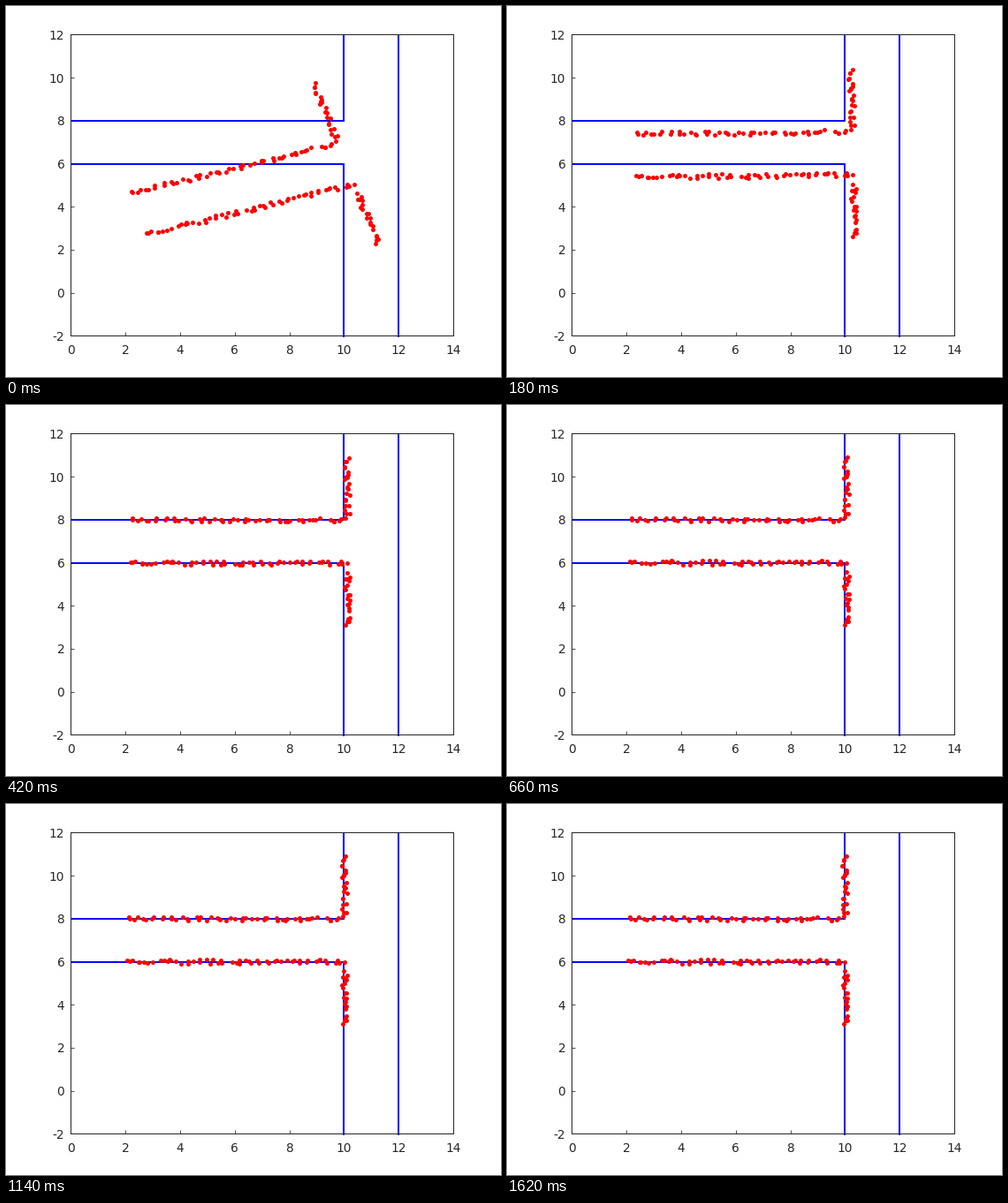
Write a matplotlib script that moves like this. It is 560 px wide and 420 px high and loops after 1.8 s.

```python
import numpy as np
import matplotlib.pyplot as plt
from matplotlib.animation import FuncAnimation

W, H, DPI = 560, 420, 100
FRAMES, STEP_MS, LAST = 30, 60, 27
INK = "#262626"
PT = 72 / DPI  # points per pixel

plt.rcParams.update({
    "font.family": "DejaVu Sans",
    "font.size": 13.8 * PT,
    "axes.unicode_minus": False,
    "toolbar": "None",
})

# Axes box in stage pixels, and the data limits
LEFT, RIGHT, TOP, BOTTOM = 73.1, 506.1, 32.4, 373.4
X_MAX, Y_MIN, Y_MAX = 14, -2, 12

rng = np.random.default_rng(4)


def spread(a, b, n):
    """Irregular positions that still cover the whole range."""
    gap = (b - a) / (n - 1)
    return np.clip(np.linspace(a, b, n) + rng.uniform(-gap, gap, n), a, b)


def hits(start, end, level, n, upright=False):
    """Noisy scan hits along one wall."""
    along = spread(start, end, n)
    across = level + rng.uniform(-0.1, 0.1, n)
    return np.column_stack([across, along] if upright else [along, across])


scan = np.vstack([
    hits(2.0, 9.85, 8, 52),
    hits(2.0, 10.0, 6, 56),
    hits(8.1, 10.9, 10, 24, upright=True),
    hits(3.05, 5.6, 10, 21, upright=True),
])
PIVOT = np.array([6.5, 7.0])


def pose(k):
    """Remaining alignment error after k steps: angle and shift about PIVOT."""
    angle = 0.3 * 0.36 ** k
    dx = min(0.22 + 0.02 * k, 0.28 * 0.8 ** (k - 3))
    dy = -2.02 * np.exp(-0.247 * k ** 1.5)
    return angle, dx, dy


def moved(k):
    a, dx, dy = pose(min(k, LAST))
    c, s = np.cos(a), np.sin(a)
    rot = np.array([[c, -s], [s, c]])
    return (scan - PIVOT) @ rot.T + PIVOT + (dx, dy)


fig = plt.figure(figsize=(W / DPI, H / DPI), dpi=DPI, facecolor="white")
ax = fig.add_axes([LEFT / W, 1 - BOTTOM / H,
                   (RIGHT - LEFT) / W, (BOTTOM - TOP) / H])
ax.set(xlim=(0, X_MAX), ylim=(Y_MIN, Y_MAX),
       xticks=range(0, X_MAX + 1, 2), yticks=range(Y_MIN, Y_MAX + 1, 2))
ax.tick_params(direction="in", length=4 * PT, width=0.8 * PT,
               color=INK, labelcolor=INK)
ax.tick_params(axis="x", pad=9.8 * PT)
ax.tick_params(axis="y", pad=6.8 * PT)
for spine in ax.spines.values():
    spine.set(color=INK, linewidth=0.99 * PT)

FLOOR = Y_MIN - 0.05
WALLS = [([0, 10, 10], [8, 8, Y_MAX]),
         ([0, 10, 10], [6, 6, FLOOR]),
         ([12, 12], [FLOOR, Y_MAX])]
for xs, ys in WALLS:
    ax.plot(xs, ys, color="blue", lw=1.99 * PT, solid_capstyle="butt",
            solid_joinstyle="miter", clip_on=False)

dots, = ax.plot([], [], "o", color="red", ms=5 * PT, mew=0, zorder=4)


def draw(k):
    dots.set_data(*moved(k).T)
    return dots,


anim = FuncAnimation(fig, draw, frames=FRAMES, interval=STEP_MS,
                     repeat=True, repeat_delay=0, blit=False)
plt.show()
```
